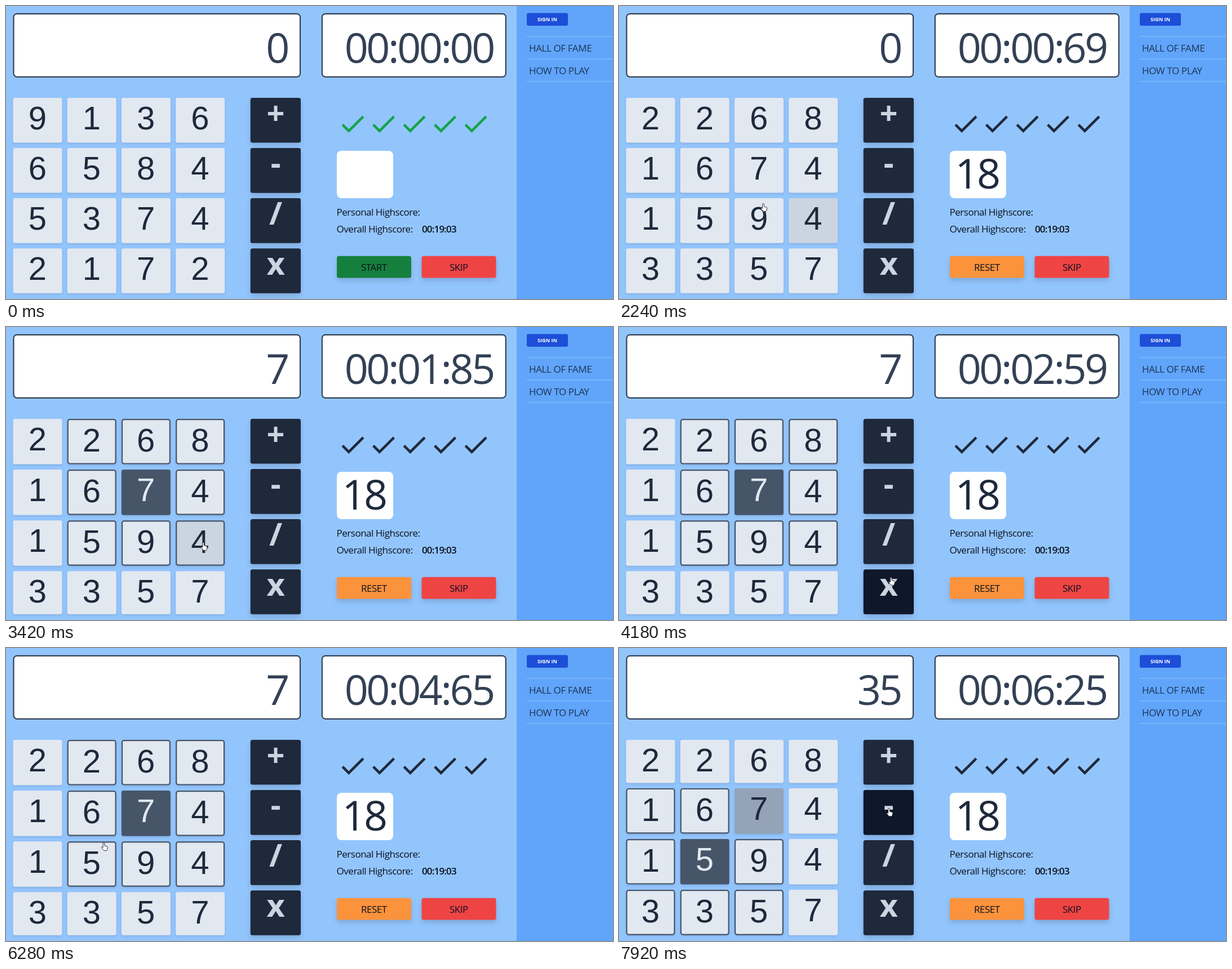
These frames come from a looping animation (1077 by 520 pixels, 7.99 s). An HTML page:

```html
<!DOCTYPE html>
<html lang="en">
<head>
<meta charset="utf-8">
<title>Number game</title>
<style>
  html, body { margin: 0; width: 100%; height: 100%; overflow: hidden; background: #93c5fd; }
  svg { display: block; }
  text { font-family: "Open Sans", "Noto Sans", sans-serif; white-space: pre; }
  .digit { font: 58px "Liberation Sans", Arial, sans-serif; text-anchor: middle; }
  .op { font-size: 56px; font-weight: 700; text-anchor: middle; fill: #cbd5e1; }
  .display { font-size: 73.5px; letter-spacing: -3.4px; text-anchor: end; fill: #334155; }
  .goal { text-anchor: middle; fill: #1e293b; }
  .label { font-size: 17px; letter-spacing: -.5px; fill: #0b1120; }
  .bold { font-weight: 600; letter-spacing: -.85px; }
  .menu { font-size: 17px; letter-spacing: -.38px; fill: #1e3358; }
  .sign { font-size: 9.2px; font-weight: 700; text-anchor: middle; fill: #fff; }
  .mid { text-anchor: middle; }
  .soft { filter: drop-shadow(0 2px 2px #0000001c); }
  .deep { filter: drop-shadow(0 5px 5px #00000024); }
</style>
</head>
<body>
<svg id="stage" width="1077" height="520" viewBox="0 0 1077 520"></svg>
<script>
const stage = document.getElementById('stage');
const LOOP = 7990, START = 1535, FIRST = 2800, SECOND = 7450, LAG = 90;
const KEY = 87, TOP = 163, GAP = 9.5;

function set(el, attrs) {
  for (const name in attrs) el.setAttribute(name, attrs[name]);
}
function add(tag, attrs, content = '') {
  const el = document.createElementNS('http://www.w3.org/2000/svg', tag);
  set(el, attrs);
  el.textContent = content;
  return stage.appendChild(el);
}
const rect = (x, y, width, height, fill, rx = 0, cls = '') =>
  add('rect', { x, y, width, height, fill, rx, class: cls });
const text = (x, y, cls, content) => add('text', { x, y, class: cls }, content);

// Side panel
rect(906, 0, 171, 520, '#60a5fa');
rect(924, 12.5, 73, 22.5, '#1d4ed8', 3);
text(960.5, 27.2, 'sign', 'SIGN IN');
['HALL OF FAME', 'HOW TO PLAY', ''].forEach((item, i) => {
  rect(924, 53.5 + 40 * i, 153, 1, '#93c5fd');
  text(928, 81 + 40 * i, 'menu', item);
});

// Displays
function display(x, width) {
  set(rect(x, 13.8, width, 112, '#fff', 6), { stroke: '#334155', 'stroke-width': 2.2 });
  return text(x + width - 22, 101, 'display', '');
}
const result = display(13.5, 508.5);
const clock = display(560.8, 326);

// Number keys
const boards = ['9136658453742172', '2268167415943357'];
const keys = [...boards[0]].map((_, i) => ({
  row: i >> 2, col: i % 4,
  box: rect(12.5 + 96.2 * (i % 4), 0, KEY, 80, '', 3.5, 'soft'),
  label: text(0, 0, 'digit', '')
}));

// Operators
const ops = [...'+-/x'].map((sign, i) => {
  const y = TOP + 89.05 * i;
  const box = rect(433.7, y, 89.3, 79.6, '', 3.5, 'deep');
  text(478.6, y + 46.7, 'op', sign);
  return { y, box };
});

// Progress, goal and scores
const checks = [0, 1, 2, 3, 4].map(i => add('path', {
  d: 'M9 16.17 4.83 12 3.41 13.41 9 19 21 7 19.59 5.59z',
  transform: `translate(${587.7 + 54.55 * i} 181.8) scale(2.275)`
}));
rect(587, 257, 100, 84, '#fff', 8);
const goal = text(635, 323.8, 'display goal', '');
goal.style.cssText = 'text-anchor: middle; fill: #1e293b';
text(586.6, 372, 'label', 'Personal Highscore:');
text(586.6, 401.5, 'label', 'Overall Highscore:');
text(738, 401.5, 'label bold', '00:19:03');

function button(x, fill, name) {
  const box = rect(x, 443.7, 132, 38.8, fill, 3.5, 'deep');
  return { box, label: text(x + 65.8, 470, 'label mid', name) };
}
const go = button(587, '', '');
button(737.5, '#ef4444', 'SKIP');

const hand = add('path', {
  d: 'M-1.5 1.2a1.4 1.4 0 0 1 2.8 0V5.2l4.2 1q1.4.4 1.2 2l-.7 3.4-1 2.2H.2L-3.8 9.2q-.9-1.6.9-1.8L-1.5 8.4z',
  fill: '#fff', stroke: '#1b1b1b', 'stroke-width': .9
});

// Pointer stops: time, x, y
const route = [
  [480, 974, 522], [1240, 654, 475], [1600, 654, 475], [2240, 256, 351],
  [2950, 250, 290], [3420, 350, 383], [3800, 484, 246], [4100, 483, 444],
  [4800, 481, 448], [5260, 195, 380], [6100, 178, 338], [7100, 154, 381],
  [SECOND, 154, 381], [7840, 479, 285]
];

function pointer(t) {
  const n = route.findIndex(stop => stop[0] > t);
  const b = route.at(n), a = route[n - 1] || b;
  const k = n > 0 ? (t - a[0]) / (b[0] - a[0]) : 1;
  return [a[1] + (b[1] - a[1]) * k, a[2] + (b[2] - a[2]) * k];
}

const pad = n => String(n).padStart(2, '0');
const near = (a, b) => Math.abs(a - b) < 2;

function draw(t) {
  const running = t >= START;
  const active = t < FIRST ? -1 : t < SECOND ? 6 : 9;
  const used = active === 9 ? 6 : -1;
  const [px, py] = pointer(t);
  const [hx, hy] = pointer(t - LAG);
  const over = (x, y, w, h) => hx >= x && hx <= x + w && hy >= y && hy <= y + h;

  // Rows with outlined keys are a little taller
  const ar = active >> 2, ac = active % 4;
  let top = TOP;
  const rows = [0, 1, 2, 3].map(r => {
    const y = top, h = active < 0 ? 79.55 : near(r, ar) ? 80.6 : 76.4;
    top += h + GAP;
    return { y, h };
  });

  keys.forEach(({ row, col, box, label }, i) => {
    const { y, h } = rows[row], x = 12.5 + 96.2 * col;
    const on = i === active;
    const ring = active >= 0 && !on && i !== used && near(row, ar) && near(col, ac);
    const inset = ring ? 1.1 : 0;
    set(box, {
      x: x + inset, y: y + inset, width: KEY - 2 * inset, height: h - 2 * inset,
      fill: on ? '#475569' : i === used ? '#94a3b8' : over(x, y, KEY, h) ? '#cbd5e1' : '#e2e8f0',
      stroke: ring ? '#475569' : 'none', 'stroke-width': 2.2
    });
    set(label, { x: x + 43.3, y: y + 55.6 + 2 * inset, fill: on ? '#e2e8f0' : '#1e293b' });
    label.textContent = boards[+running][i];
  });

  for (const { y, box } of ops)
    set(box, { fill: over(433.7, y, 89.3, 79.6) ? '#0f172a' : '#1e293b' });

  for (const check of checks) set(check, { fill: running ? '#1e293b' : '#16a34a' });
  const hot = over(587, 443.7, 132, 38.8);
  set(go.box, { fill: running ? (hot ? '#f97316' : '#fb923c') : hot ? '#166534' : '#15803d' });
  go.label.textContent = running ? 'RESET' : 'START';
  goal.textContent = running ? '18' : '';
  result.textContent = active < 0 ? '0' : active === 6 ? '7' : '35';

  const hundredths = Math.max(0, Math.floor((t - START) * .0979 + .5));
  clock.textContent = `00:${pad(Math.floor(hundredths / 100))}:${pad(hundredths % 100)}`;

  set(hand, { transform: `translate(${px} ${py})`, visibility: t < 480 ? 'hidden' : 'visible' });
}

const begin = performance.now();
function tick() {
  draw((performance.now() - begin) % LOOP);
  requestAnimationFrame(tick);
}
tick();
</script>
</body>
</html>
```
